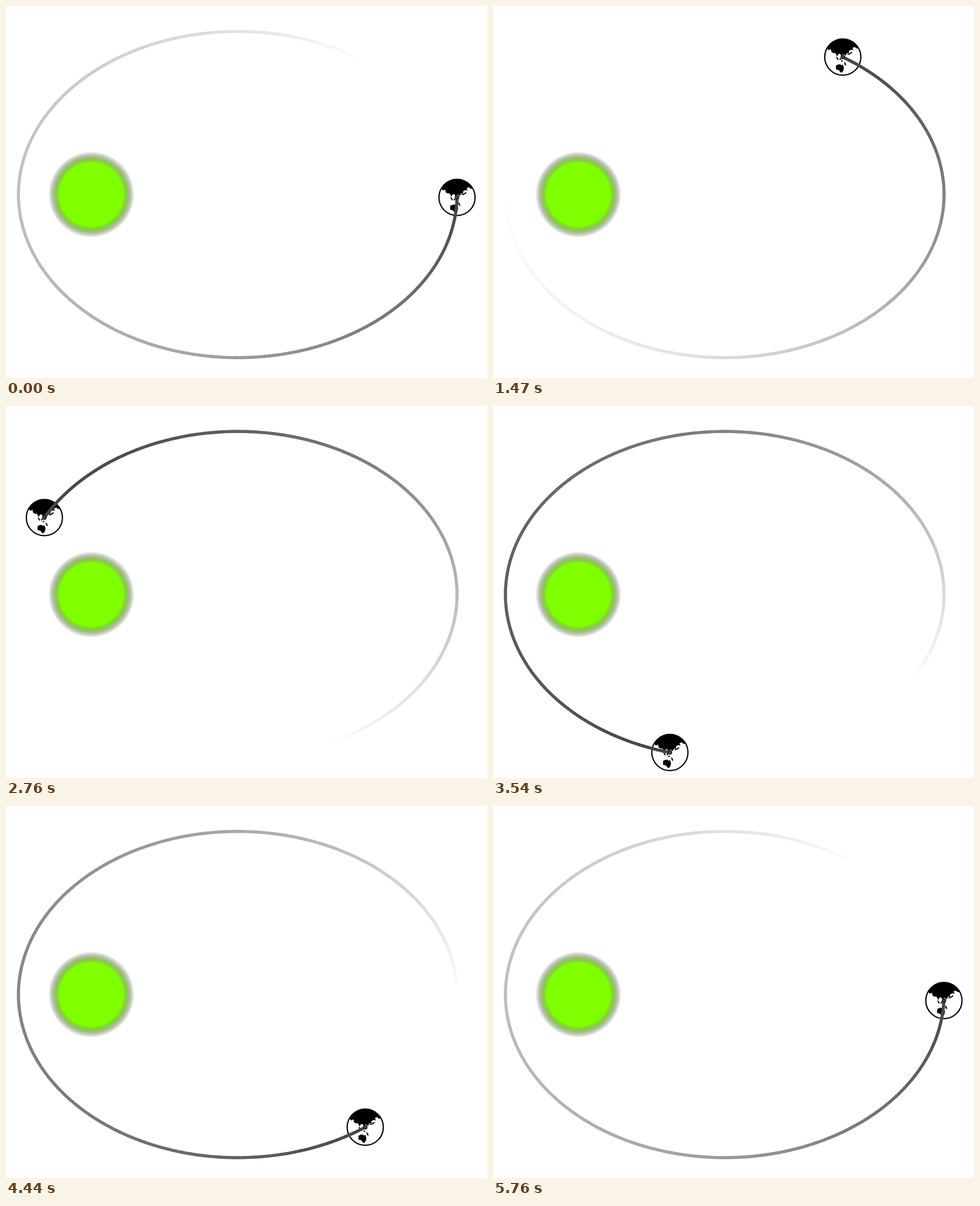
Write an HTML page that moves like this. It is 851 by 658 pixels and loops after 5.79 s.

```html
<!DOCTYPE html>
<html lang="en">
<head>
<meta charset="utf-8">
<title>Elliptical orbit</title>
<style>
  html, body { margin: 0; width: 100%; height: 100%; overflow: hidden; background: #fff; }
  svg { display: block; }
</style>
</head>
<body>
<svg width="851" height="658" viewBox="0 0 851 658">
  <defs>
    <radialGradient id="glow">
      <stop offset="0.74" stop-color="#80ff00"/>
      <stop offset="1" stop-color="#000" stop-opacity="0"/>
    </radialGradient>
  </defs>
  <circle cx="151" cy="333.5" r="76" fill="url(#glow)"/>
  <g id="planet">
    <circle r="32" fill="#fff"/>
    <path d="M-28-16A32.3 32.3 0 0 1 28-16L24-15 21-18 17-16 19-12 15-13 11-11 11-7 7-7 5-2 3-4 0-5-2-1-5-6-8-5-10-1-13-7-17-7-20-9-21-14-25-12Z"/>
    <path d="M-12 15L-8 13-4 13-2 15 0 13 2 19 1 24-2 28-5 26-7 23-12 22Z"/>
    <path d="M2 8L5 11 6 16 3 13Z"/>
    <path d="M-11 0L-8 5M-5 5L-4 2M-3 7H0M8-5Q13-5 16-9" fill="none" stroke="#000" stroke-width="2"/>
    <circle r="32" fill="none" stroke="#000" stroke-width="2.2"/>
  </g>
  <g id="trail" fill="none" stroke-width="5.4" stroke-linecap="round"></g>
  <circle id="head" r="3.2" fill="#444" stroke="#222" stroke-width="1.6"/>
</svg>
<script>
  const PERIOD = 5790, STEP = 30, APHELION_TIME = 27;
  const CX = 410, CY = 333.5, A = 388, B = 288.5;
  const ECC = Math.sqrt(1 - (B / A) ** 2);
  const TRAIL_SPAN = 1.5 * Math.PI;
  const SEGMENTS = 240;
  const SHADE = 68;

  const planet = document.getElementById('planet');
  const trail = document.getElementById('trail');
  const head = document.getElementById('head');

  const segments = Array.from({ length: SEGMENTS }, () =>
    trail.appendChild(document.createElementNS('http://www.w3.org/2000/svg', 'line')));

  // Kepler's equation, solved by Newton's method
  function eccentricAnomaly(mean) {
    let E = mean - ECC * Math.sin(mean - Math.PI);
    for (let i = 0; i < 10; i++) {
      E -= (E - ECC * Math.sin(E) - mean) / (1 - ECC * Math.cos(E));
    }
    return E;
  }

  const pointAt = E => [CX - A * Math.cos(E), CY + B * Math.sin(E)];

  function render(time) {
    const mean = Math.PI + 2 * Math.PI * (time - APHELION_TIME) / PERIOD;
    const end = eccentricAnomaly(mean);
    const start = eccentricAnomaly(mean - TRAIL_SPAN);
    const [x, y] = pointAt(end);

    let previous = pointAt(start);
    segments.forEach((line, i) => {
      const E = start + (end - start) * (i + 1) / SEGMENTS;
      const age = (mean - (E - ECC * Math.sin(E))) / TRAIL_SPAN;
      const grey = Math.round(SHADE + (255 - SHADE) * age);
      const next = pointAt(E);
      line.setAttribute('x1', previous[0]);
      line.setAttribute('y1', previous[1]);
      line.setAttribute('x2', next[0]);
      line.setAttribute('y2', next[1]);
      line.setAttribute('stroke', `rgb(${grey},${grey},${grey})`);
      previous = next;
    });

    const place = `translate(${x} ${y})`;
    planet.setAttribute('transform', place);
    head.setAttribute('transform', place);
  }

  const origin = performance.now();
  function tick() {
    const time = (performance.now() - origin) % PERIOD;
    render(Math.floor(time / STEP) * STEP);
    requestAnimationFrame(tick);
  }
  tick();
</script>
</body>
</html>
```
